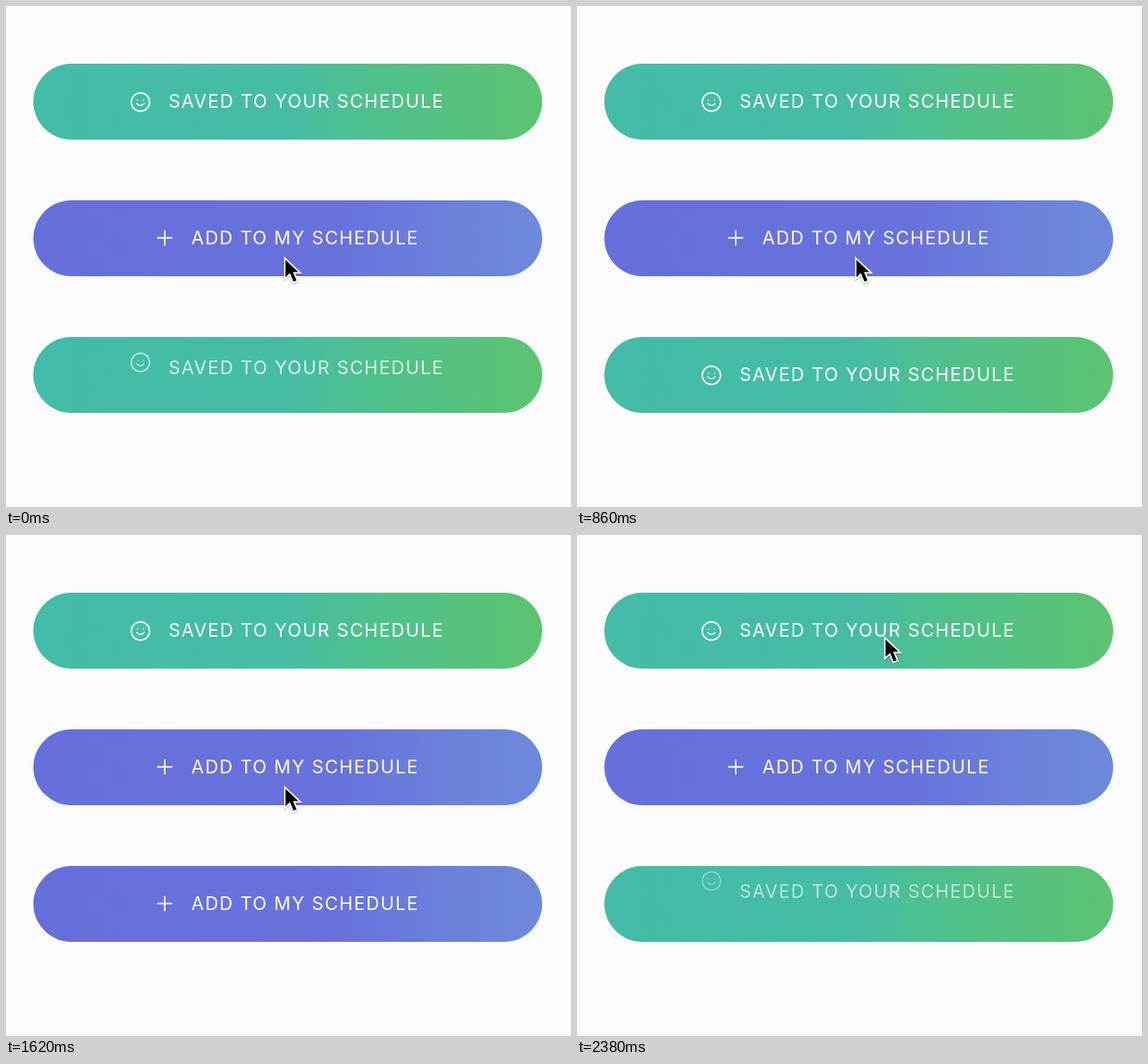
Recreate the animation shown at these times as an HTML page. Size 744 by 660 pixels, loop 2400 ms.

```html
<!DOCTYPE html>
<html lang="en">
<head>
<meta charset="utf-8">
<title>Schedule buttons</title>
<style>
  html, body { margin: 0; height: 100%; overflow: hidden; background: #fcfcfe; }
  svg { display: block; }
  text { font: 400 24px Inter, "Open Sans", sans-serif; letter-spacing: 1.61px; fill: #fff; }
  .icon { fill: none; stroke: #fff; stroke-width: 2; }
  .face { stroke-width: 1.7; stroke-linecap: round; }
  .cursor { stroke: #fff; stroke-width: 2; filter: drop-shadow(0 1px 1px rgba(0, 0, 0, .3)); }
</style>
</head>
<body>
<svg id="stage" width="744" height="660" viewBox="0 0 744 660"></svg>
<script>
const LOOP = 2400, TO_ADD = 930, TO_SAVED = 2130;
const stage = document.getElementById('stage');

const gradient = (id, colors) => `<linearGradient id="${id}">${
  colors.map(([at, color]) => `<stop offset="${at}" stop-color="${color}"/>`).join('')}</linearGradient>`;

const smile = `<circle cx="141" cy="50.5" r="12"/>
  <path class="face" d="M136.2 52.5Q141 57.5 145.8 52.5M137 48h.1M145 48h.1"/>`;
const plus = '<path d="M163 49.5h20M173 39.5v20"/>';

const label = (name, icon, x, text) => `<g class="${name}">
  <text x="${x}" y="57.5">${text}</text><g class="icon">${icon}</g></g>`;

const button = (id, y) => `<g id="${id}" transform="translate(36 ${y})" clip-path="url(#pill)">
  <rect width="670" height="100"/>
  ${label('saved', smile, 178, 'SAVED TO YOUR SCHEDULE')}
  ${label('add', plus, 208, 'ADD TO MY SCHEDULE')}</g>`;

stage.innerHTML = `
  <clipPath id="pill"><rect width="670" height="100" rx="50"/></clipPath>
  ${gradient('purple', [[0, '#6670dc'], [.6, '#6872dc'], [.8, '#6b80db'], [1, '#6d8adb']])}
  ${gradient('green', [[0, '#43bca8'], [.5, '#45bda4'], [.65, '#4ec08f'], [1, '#5cc46f']])}
  ${button('top', 76)}${button('middle', 256)}${button('bottom', 436)}
  <path id="cursor" class="cursor" d="M1 2.5V30L7.5 24L12 35L18 32.5L13.3 22H21.5Z"/>`;

const clamp = v => Math.min(1, Math.max(0, v));
const sine = v => (1 - Math.cos(Math.PI * v)) / 2;
const bezier = (s, a, b) => 3 * (1 - s) ** 2 * s * a + 3 * (1 - s) * s * s * b + s ** 3;

// cubic-bezier(.68, -.55, .265, 1.55)
function backInOut(v) {
  let low = 0, high = 1;
  for (let i = 0; i < 20; i++) {
    const mid = (low + high) / 2;
    if (bezier(mid, .68, .265) < v) low = mid; else high = mid;
  }
  return bezier(high, -.55, 1.55);
}
const enter = ms => backInOut(clamp(ms / 500));
const leave = ms => 1 - clamp((ms - 40) / 110) ** 3;

// The icon inherits the label's shift and fade and repeats both.
function setLabel(id, name, shown, travel) {
  const group = stage.querySelector(`#${id} .${name}`);
  for (const part of [group, group.querySelector('.icon')]) {
    part.setAttribute('transform', `translate(0 ${travel * (1 - shown)})`);
    part.setAttribute('opacity', clamp(shown));
  }
}

// Shows a button some ms after it switched to the saved or the add state.
function setButton(id, isSaved, ms) {
  stage.querySelector(`#${id} > rect`).setAttribute('fill', isSaved ? 'url(#green)' : 'url(#purple)');
  setLabel(id, 'saved', isSaved ? enter(ms) : leave(ms), -40);
  setLabel(id, 'add', isSaved ? leave(ms) : enter(ms), 50);
}

function draw(t) {
  const isSaved = t < TO_ADD || t >= TO_SAVED;
  setButton('bottom', isSaved, (t - (isSaved ? TO_SAVED : TO_ADD) + LOOP) % LOOP);

  const move = clamp((t - 1838) / 558);
  const x = 366 + 38.3 * clamp(move * 1.6), y = 329.5 - 197 * sine(move);
  document.getElementById('cursor').setAttribute('transform', `translate(${x} ${y})`);
}

setButton('top', true, LOOP);
setButton('middle', false, LOOP);

const start = performance.now();
function tick() {
  draw((performance.now() - start) % LOOP);
  requestAnimationFrame(tick);
}
tick();
</script>
</body>
</html>
```
